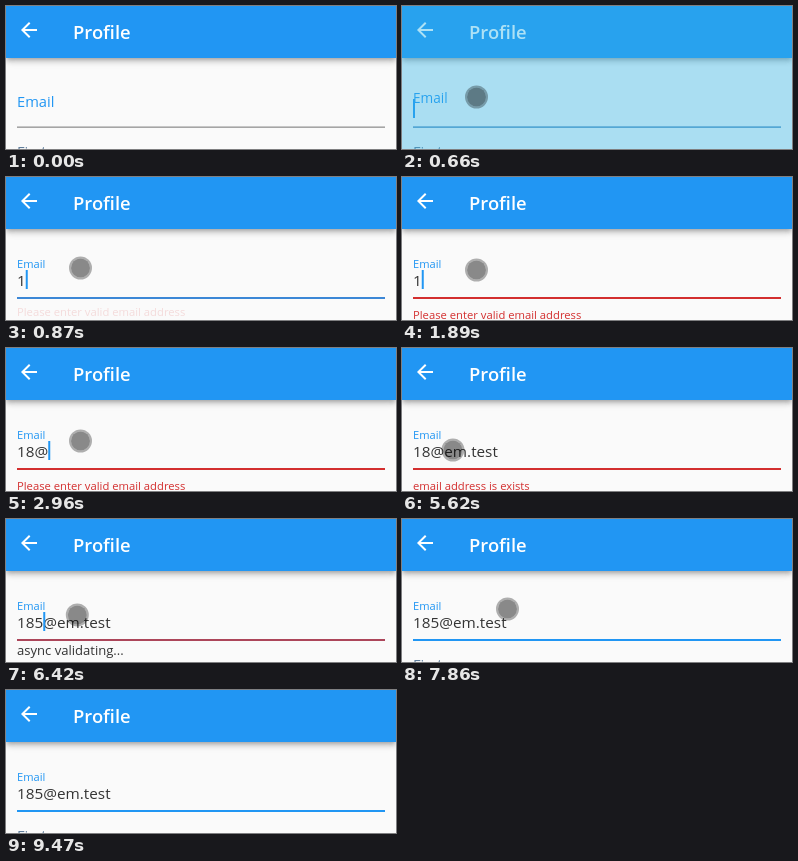
An HTML page that plays this animation: 390x143 px, repeating every 9540 ms.

```html
<!DOCTYPE html>
<html lang="en">
<head>
<meta charset="utf-8">
<style>
  html, body { margin: 0; width: 100%; height: 100%; overflow: hidden; background: #fafafa; }
  body { font-family: "Open Sans", "Noto Sans", sans-serif; }
  #bar {
    position: absolute; top: 0; left: 0; width: 390px; height: 52px; background: #2196f3;
    box-shadow: 0 2px 4px -1px rgba(0,0,0,.2), 0 4px 5px rgba(0,0,0,.14), 0 1px 10px rgba(0,0,0,.12);
  }
  svg { position: absolute; top: 0; left: 0; display: block; }
</style>
</head>
<body>
<div id="bar"></div>
<svg width="390" height="143" viewBox="0 0 390 143">
  <path transform="translate(11 12)" fill="#fff" d="M20 11H7.83l5.59-5.59L12 4l-8 8 8 8 1.41-1.41L7.83 13H20z"/>
  <text x="67" y="32.5" font-size="18.4" font-weight="600" fill="#fff">Profile</text>
  <text id="label" x="11" fill="#2196f3">Email</text>
  <text id="value" x="11" y="109" font-size="15.3" fill="#333"></text>
  <rect id="caret" y="93" width="2" height="19" fill="#2196f3"/>
  <rect id="line" x="11" width="368"/>
  <text id="message" x="11"></text>
  <text id="next" x="11" y="151" font-size="14.7" fill="#607d9b">First name</text>
  <rect id="flash" width="390" height="143" fill="#33b5e5"/>
  <g id="dot">
    <circle r="9.5" fill="#000" fill-opacity=".45"/>
    <circle r="10.5" fill="none" stroke="#000" stroke-opacity=".3" stroke-width="2"/>
  </g>
</svg>
<script>
const LOOP = 9540, FOCUS = 600, BLINK = 490;
const GRAY = [165, 165, 165], BLUE = [33, 150, 243], RED = [211, 47, 47];
const ADDRESS = '18@em.test', EDITED = '185@em.test';

// [time, text, caret index]
const edits = [
  [0, '', 0], [FOCUS, '', 0],
  ...[850, 2210, 2900, 3160, 3290, 3490, 3690, 3760, 3820, 3890]
    .map((t, i) => [t, ADDRESS.slice(0, i + 1), i + 1]),
  [5900, ADDRESS, 2], [6390, EDITED, 3]
];

// [time, text, underline colour]
const states = [
  [0, '', GRAY], [FOCUS, '', BLUE],
  [850, 'Please enter valid email address', RED],
  [3750, 'async validating...', BLUE],
  [5210, 'email address is exists', RED],
  [6390, 'async validating...', BLUE],
  [7660, '', BLUE], [9470, '', [52, 148, 225]]
];

// [time, x, y]
const path = [
  [190, 190, 150], [500, 74.5, 91], [1600, 74.5, 91], [1620, 74.5, 93], [5400, 74.5, 93],
  [5620, 51, 102], [5880, 31, 103], [6210, 31, 103], [6600, 105.5, 90], [8330, 105.5, 90],
  [8340, 131, 121], [8420, 131, 121]
];

const $ = id => document.getElementById(id);
const [label, value, caret, line, message, next, flash, dot] =
  ['label', 'value', 'caret', 'line', 'message', 'next', 'flash', 'dot'].map($);
const set = (el, attrs) => { for (const k in attrs) el.setAttribute(k, attrs[k]); };
const clamp = v => Math.max(0, Math.min(1, v));
const mix = (a, b, p) => a + (b - a) * p;
const indexAt = (list, t) => list.findLastIndex(item => item[0] <= t);

function drawField(t) {
  const focus = clamp((t - FOCUS) / 200);
  set(label, { y: mix(100.5, 90.5, focus), 'font-size': mix(14.7, 11.1, focus) });

  const [typed, text, index] = edits[indexAt(edits, t)];
  value.textContent = text;
  const on = t >= FOCUS && t < 9470 && Math.floor((t - typed) / BLINK) % 2 === 0;
  set(caret, {
    x: 11 + (index ? value.getSubStringLength(0, index) : 0),
    opacity: on ? 1 : 0
  });

  const i = indexAt(states, t);
  const [start, note, color] = states[i];
  const before = states[Math.max(0, i - 1)][2];
  const p = clamp((t - start) / 140);
  const height = mix(1.6, 2, focus);
  set(line, {
    y: 122 - height, height,
    fill: `rgb(${color.map((c, k) => Math.round(mix(before[k], c, p)))})`
  });

  const error = color === RED;
  message.textContent = note;
  set(message, {
    y: error ? mix(139, 142, p) : 136,
    'font-size': error ? 11.25 : 13.05,
    fill: error ? '#d32f2f' : '#333',
    opacity: error ? p : 1
  });
  set(next, { opacity: note ? 0 : 1 });
}

function drawTouch(t) {
  set(flash, { opacity: t < 590 ? 0 : .4 * clamp((860 - t) / 100) });
  const i = indexAt(path, t);
  const a = path[i], b = path[i + 1];
  set(dot, { opacity: a && b ? 1 : 0 });
  if (!a || !b) return;
  const p = (t - a[0]) / (b[0] - a[0]);
  set(dot, { transform: `translate(${mix(a[1], b[1], p)} ${mix(a[2], b[2], p)})` });
}

function frame() {
  const t = performance.now() % LOOP;
  drawField(t);
  drawTouch(t);
  requestAnimationFrame(frame);
}
frame();
</script>
</body>
</html>
```
